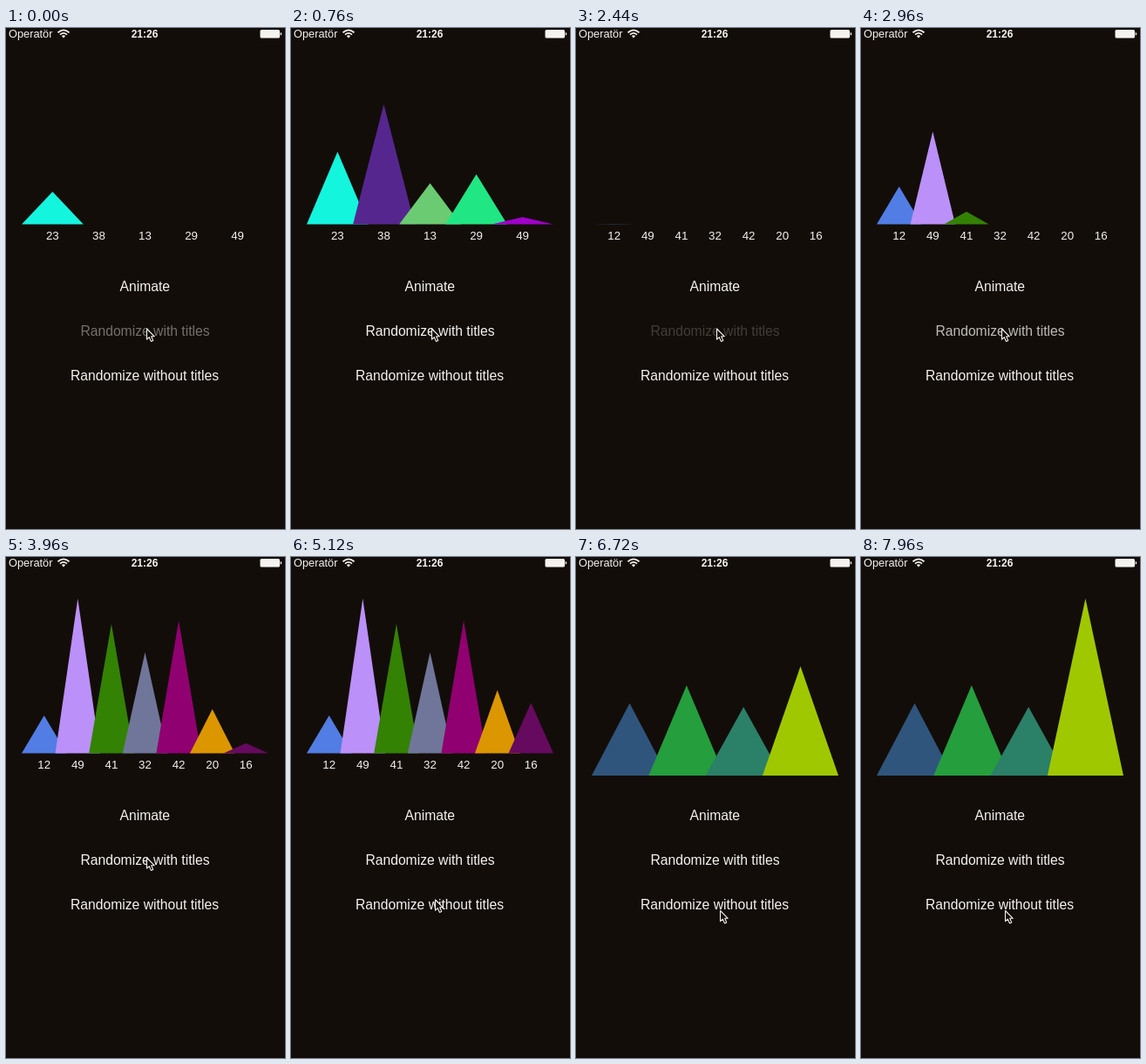
Animation, 320 px wide and 573 px high, one loop 8 s. Source, as an HTML page:

```html
<!DOCTYPE html>
<html lang="en">
<head>
<meta charset="utf-8">
<title>Triangle chart</title>
<style>
  html, body { margin: 0; width: 100%; height: 100%; overflow: hidden; background: #130d09; }
  svg { display: block; width: 100%; height: 100%; }
  text { font: 13.3px "Liberation Sans", Arial, sans-serif; fill: #f5f3f0; text-anchor: middle; }
  .button { font-size: 15.7px; }
  .carrier { font-size: 12.8px; text-anchor: start; }
  .clock { font-size: 12px; font-weight: bold; }
</style>
</head>
<body>
<svg viewBox="0 0 320 573">
  <text class="carrier" x="3" y="11">Operatör</text>
  <g fill="none" stroke="#f5f3f0" stroke-width="1.8">
    <path d="M59.5 5.2Q66 -0.4 72.5 5.2M62 7.6Q66 4.2 70 7.6"/>
    <path d="M63.8 9.1Q66 7.4 68.2 9.1L66 11.4Z" fill="#f5f3f0" stroke="none"/>
  </g>
  <text class="clock" x="159" y="11">21:26</text>
  <g fill="#f5f3f0">
    <rect x="291.5" y="2" width="22.5" height="9.5" rx="1.5"/>
    <path d="M314.7 5q1.6 0 1.6 1.8t-1.6 1.8z"/>
  </g>
  <g id="charts"></g>
  <text class="button" x="159.3" y="301.3">Animate</text>
  <text class="button" id="titled" x="159.5" y="352.3">Randomize with titles</text>
  <text class="button" id="plain" x="159" y="403">Randomize without titles</text>
  <path id="cursor" d="M0 0V12.2L2.8 9.7L4.9 14.4L7.2 13.4L5.2 8.8H8.8Z"
        fill="#130d09" stroke="#f5f3f0" stroke-width="1.1" stroke-linejoin="round"/>
</svg>
<script>
const LOOP = 8000, GROW = 476, STAGGER = GROW / 2;
const PRESS = 120, FADE = 750, DIM = 0.2;
const LEFT = 18, WIDTH = 283, TOP = 47.5, OVERLAP = 0.75;

const charts = [
  { start: -214, button: "titled", base: 224.5, titles: true,
    values: [23, 38, 13, 29, 49],
    colors: ["#14f5de", "#56268f", "#6bcb72", "#20e684", "#a000c8"] },
  { start: 2437, button: "titled", base: 224.5, titles: true,
    values: [12, 49, 41, 32, 42, 20, 16],
    colors: ["#527de4", "#bb90f8", "#338204", "#70769a", "#900070", "#dc9600", "#650a5e"] },
  { start: 5712, button: "plain", base: 250, titles: false,
    values: [20, 25, 19, 49],
    colors: ["#2f557d", "#259e3d", "#2b8068", "#a0c800"] }
];

// time, x, y of the pointer tip
const pointer = [
  [4450, 161.5, 344], [5000, 165.5, 390], [5120, 165.5, 392],
  [5320, 166, 411], [5520, 165.5, 404.5]
];

const byId = id => document.getElementById(id);
const clamp = v => Math.max(0, Math.min(1, v));

function add(parent, tag, attrs = {}) {
  const node = document.createElementNS("http://www.w3.org/2000/svg", tag);
  for (const key in attrs) node.setAttribute(key, attrs[key]);
  return parent.appendChild(node);
}

for (const chart of charts) {
  chart.group = add(byId("charts"), "g");
  const { values, base } = chart;
  const width = WIDTH / (1 + (values.length - 1) * OVERLAP);
  const max = Math.max(...values);
  chart.bars = values.map((value, i) => {
    const x = LEFT + i * width * OVERLAP;
    if (chart.titles) {
      add(chart.group, "text", { x: x + width / 2, y: 242 }).textContent = value;
    }
    return { x, width, height: (base - TOP) * value / max,
             node: add(chart.group, "path", { fill: chart.colors[i] }) };
  });
}

function buttonOpacity(id, t) {
  let opacity = 1;
  for (const { button, start } of charts) {
    if (button === id && t >= start - PRESS) {
      opacity = DIM + (1 - DIM) * clamp((t - start) / FADE);
    }
  }
  return opacity;
}

function pointerAt(t) {
  const next = pointer.findIndex(p => p[0] > t);
  if (next === 0) return pointer[0].slice(1);
  if (next < 0) return pointer[pointer.length - 1].slice(1);
  const a = pointer[next - 1], b = pointer[next];
  const u = (t - a[0]) / (b[0] - a[0]);
  const eased = u * u * (3 - 2 * u);
  return [1, 2].map(k => a[k] + (b[k] - a[k]) * eased);
}

function render(t) {
  charts.forEach((chart, index) => {
    const next = charts[index + 1];
    const shown = t >= chart.start && (!next || t < next.start);
    chart.group.style.display = shown ? "" : "none";
    if (!shown) return;
    chart.bars.forEach(({ x, width, height, node }, i) => {
      const grown = height * clamp((t - chart.start - i * STAGGER) / GROW);
      node.setAttribute("d",
        grown ? `M${x} ${chart.base}l${width / 2} ${-grown}l${width / 2} ${grown}Z` : "");
    });
  });
  for (const id of ["titled", "plain"]) byId(id).style.opacity = buttonOpacity(id, t);
  byId("cursor").setAttribute("transform", `translate(${pointerAt(t)})`);
}

let origin;
function tick(now) {
  origin ??= now;
  render((now - origin) % LOOP);
  requestAnimationFrame(tick);
}
render(0);
requestAnimationFrame(tick);
</script>
</body>
</html>
```
